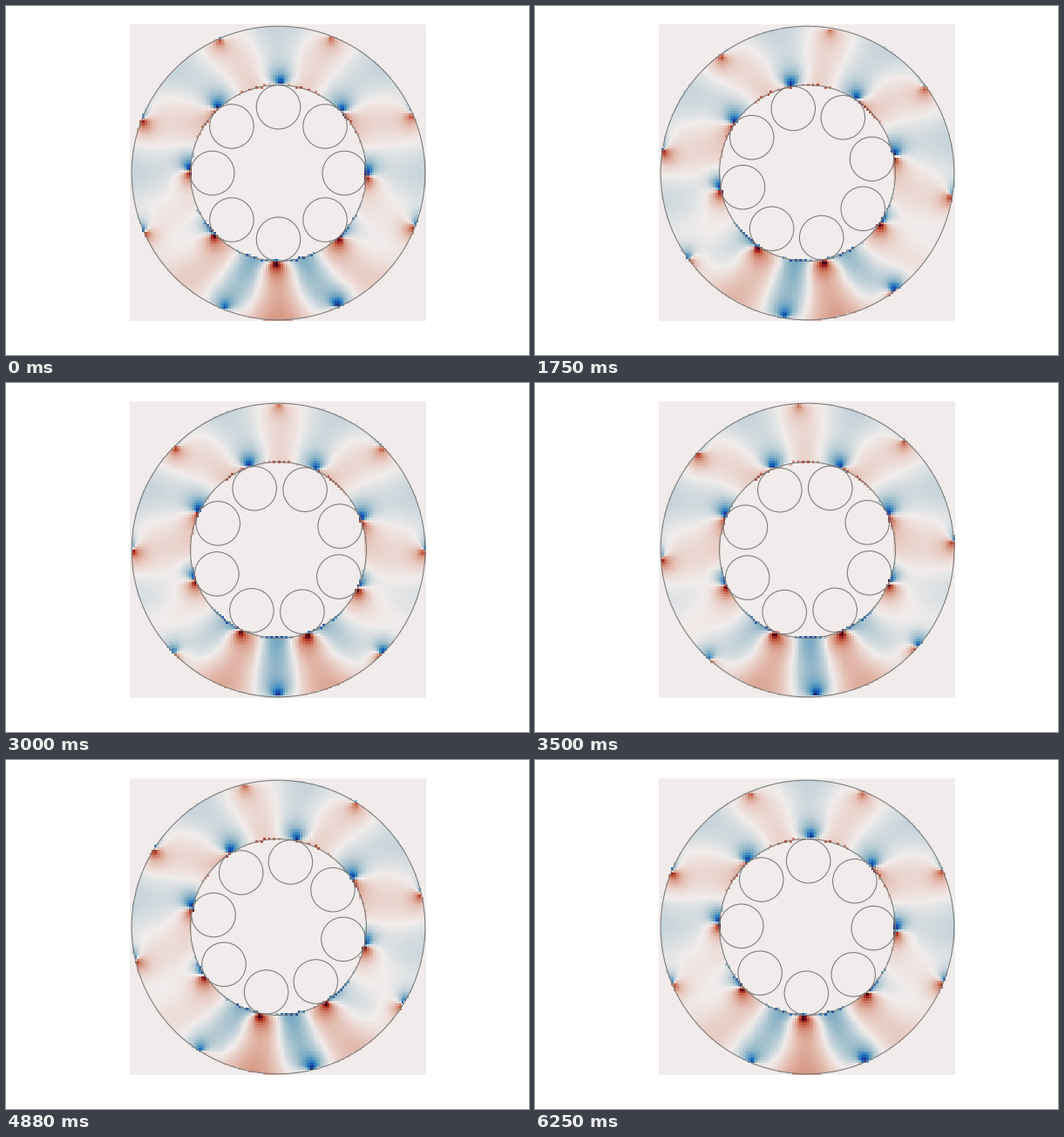
Write a matplotlib script that moves like this. It is 600 px wide and 400 px high and loops after 6.37 s.

```python
import numpy as np
import matplotlib.pyplot as plt
from matplotlib.animation import FuncAnimation
from matplotlib.colors import LinearSegmentedColormap
from matplotlib.patches import Circle

W, H, DPI = 600, 400, 100
FRAMES, LOOP_MS = 51, 6370
ROLLERS = 8
CX, CY, SCALE = 312.5, 191.5, 168.3      # ring centre and outer radius, px
LEFT, TOP, SIDE, CELLS = 142, 21, 340, 120
INNER, ROLLER_R, ORBIT = 0.6, 0.15, 0.45  # relative to the outer radius

BALANCE = LinearSegmentedColormap.from_list("balance", [
    "#181c43", "#293a8f", "#125bba", "#3d8bc0", "#98bac9", "#f1eceb",
    "#e0b2a3", "#cd7961", "#b83e2a", "#8a1124", "#3c0912"], N=513)

# Cell centres in ring units, y upwards
step = SIDE / CELLS
mid = (np.arange(CELLS) + 0.5) * step
x, y = np.meshgrid((LEFT + mid - CX) / SCALE, (CY - TOP - mid) / SCALE)
r, theta = np.hypot(x, y), np.arctan2(y, x)
cell = step / SCALE
depth = np.clip((r - INNER) / (1 - INNER), 0, 1)
ring = (r > INNER - 0.35 * cell) & (r < 1 + 0.2 * cell)
checker = np.add.outer(np.arange(CELLS), np.arange(CELLS)) % 2 == 0
rim = checker & (np.abs(r - INNER) < 0.5 * cell)

# Lobes change sign towards the loaded lower side and lean to the vertical
lobe = 0.065 - 0.26 * np.clip(-np.sin(theta), 0, 1) ** 2
lean = np.radians(10) * np.sin(2 * theta) * (1 - depth)
spread = 0.5 * (1 - 2 * depth)


def inner_weight(a):
    return 0.028 * (1 - 0.15 * np.sin(a))


def outer_weight(a):
    load = np.clip(np.cos(a + np.radians(57)), 0, 1) ** 4
    return 0.014 - 0.003 * np.cos(a - np.pi / 4) + 0.014 * load


def spot(radius, a, weight, inward=0):
    """Vertical gradient around a contact point, plus an inward share."""
    dx, dy = x - radius * np.cos(a), y - radius * np.sin(a)
    d2 = dx**2 + dy**2
    pull = -dy - inward * (dx * np.cos(a) + dy * np.sin(a))
    return weight * pull / (d2 + 2e-4) * np.exp(-d2 / 0.15**2)


def roller_angles(i):
    turn = i / FRAMES
    return (np.arange(ROLLERS) + turn) * 2 * np.pi / ROLLERS


def field(i):
    angles = roller_angles(i)
    wave = np.cos(ROLLERS * (theta - angles[0] - lean))
    f = lobe * (spread - wave)
    f += rim * 0.25 * np.sin(theta) * (1 - wave)
    for a in angles:
        a_in = a - np.radians(1.5)
        a_out = a + np.radians(23.7)
        f += spot(INNER, a_in, inner_weight(a_in))
        f += spot(1, a_out, outer_weight(a_out), 0.8 * np.cos(a_out) ** 2)
    return np.where(ring, f, 0)


fig = plt.figure(figsize=(W / DPI, H / DPI), dpi=DPI, facecolor="white")
ax = fig.add_axes([0, 0, 1, 1])
image = ax.imshow(field(0), cmap=BALANCE, vmin=-1, vmax=1, aspect="auto",
                  interpolation="nearest",
                  extent=(LEFT, LEFT + SIDE, TOP + SIDE, TOP))
ax.set_xlim(0, W)
ax.set_ylim(H, 0)
ax.axis("off")


def add_circle(radius):
    return ax.add_patch(Circle((CX, CY), radius * SCALE, fill=False,
                               edgecolor="0.47", linewidth=0.75))


for radius in (1, INNER):
    add_circle(radius)
rollers = [add_circle(ROLLER_R) for _ in range(ROLLERS)]


def update(i):
    image.set_data(field(i))
    for roller, a in zip(rollers, roller_angles(i)):
        roller.center = (CX + ORBIT * SCALE * np.cos(a),
                         CY - ORBIT * SCALE * np.sin(a))
    return [image, *rollers]


anim = FuncAnimation(fig, update, frames=FRAMES, interval=LOOP_MS / FRAMES,
                     repeat=True, repeat_delay=0, blit=False)
plt.show()
```
